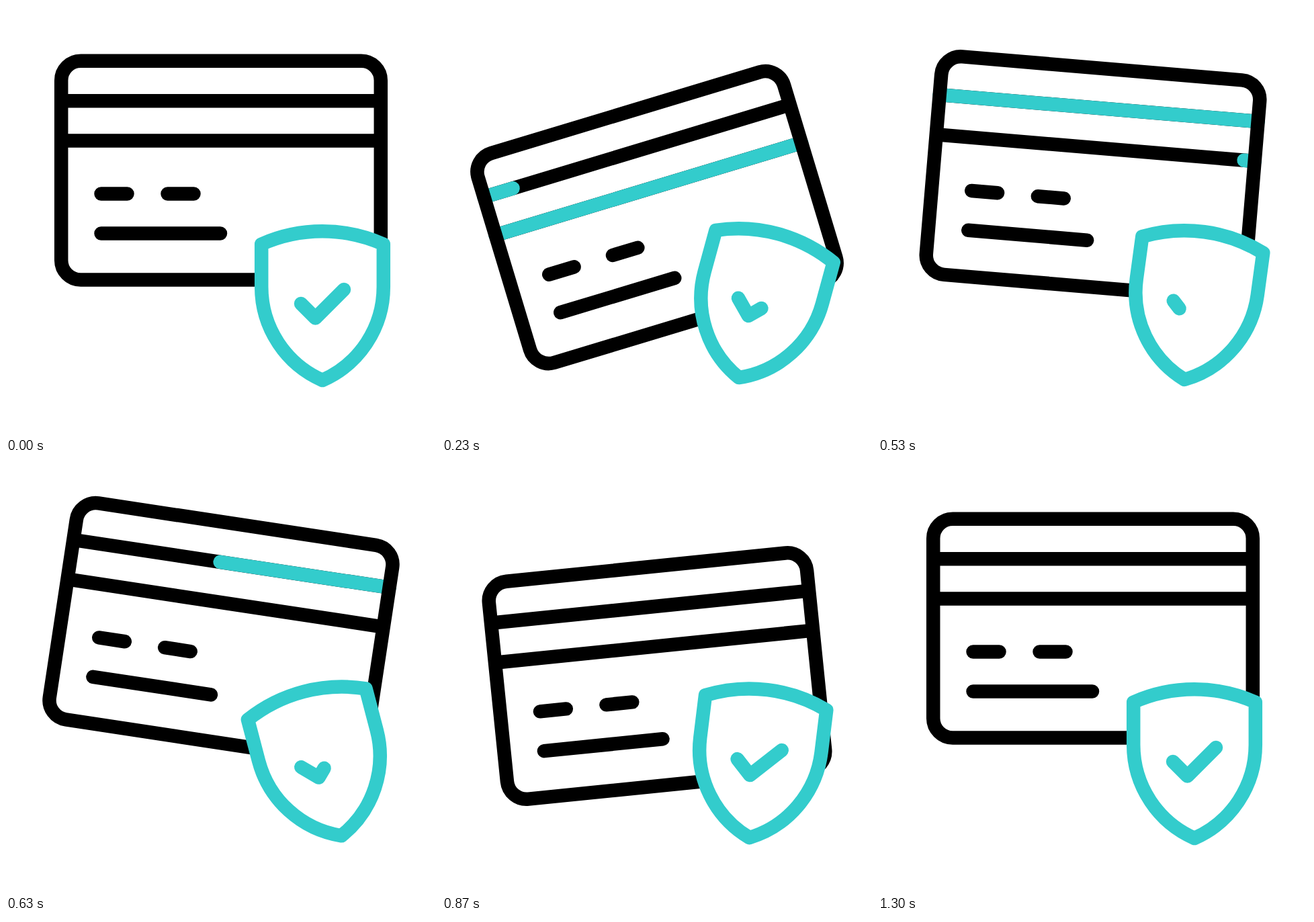
An HTML page that plays this animation: 640x640 px, repeating every 1.67 s.

```html
<!DOCTYPE html>
<html lang="en">
<head>
<meta charset="utf-8">
<title>Secure card</title>
<style>
  html, body { margin: 0; height: 100%; overflow: hidden; background: #fff; }
  svg { display: block; width: 100vw; height: 100vh; fill: none; stroke: #000; stroke-width: 20.5; stroke-linejoin: round; }
  .round { stroke-linecap: round; }
  .teal { stroke: #3cc; stroke-linecap: round; }
</style>
</head>
<body>
<svg viewBox="0 0 640 640">
  <g id="card">
    <path d="M82 141.2H558M82 200.5H558"/>
    <path id="upper" class="teal"/>
    <path id="lower" class="teal"/>
    <rect x="82.2" y="81.8" width="475.6" height="325.6" rx="29"/>
    <path class="round" d="M141.5 279.5H180.5M240.5 279.5H279.5M141.5 338.6H319"/>
  </g>
  <g id="shield" class="teal">
    <path fill="#fff" d="M380.2 354.5A224 224 0 0 1 561.8 354.5V418A152 152 0 0 1 471 557A152 152 0 0 1 380.2 418Z"/>
    <path id="check" pathLength="1" d="M439 443L460.5 464.5L503 422"/>
  </g>
</svg>
<script>
const LOOP = 1670, FPS = 30;
const el = id => document.getElementById(id);

// Keys are [frame, value] pairs.
const tilt = [[0, 0], [7, -16.8], [9.2, -20], [13, -7.3], [16, 4.8], [18, 10], [19, 8.6], [25, -6], [26, -5.8], [31, -2.6], [36, 0]];
const drop = [[0, 0], [7, 70], [8.1, 74], [13, 37], [16, 10.5], [18, 0], [19, 6], [24.8, 74], [26, 71], [31, 23], [35, 0]];
const sway = [[0, 0], [13, 27.4], [19.3, -15], [26, 7], [32, -1.5], [39, 0]];
const tick = [[2.2, 1], [13, 0], [24.8, 1]];

// Monotone cubic interpolation: flat at peaks and at both ends.
function at(keys, f) {
  const last = keys.length - 1;
  if (f <= keys[0][0]) return keys[0][1];
  if (f >= keys[last][0]) return keys[last][1];
  const slope = i => (keys[i + 1][1] - keys[i][1]) / (keys[i + 1][0] - keys[i][0]);
  const tangent = i => {
    if (i === 0 || i === last) return 0;
    const a = slope(i - 1), b = slope(i);
    return a * b > 0 ? 2 * a * b / (a + b) : 0;
  };
  const i = keys.findIndex(k => k[0] > f) - 1;
  const [x0, y0] = keys[i], [x1, y1] = keys[i + 1];
  const h = x1 - x0, p = (f - x0) / h, q = 1 - p;
  return y0 + (y1 - y0) * p * p * (3 - 2 * p) + h * p * q * (q * tangent(i) - p * tangent(i + 1));
}

// A stripe fills from the left, then empties from the left.
function stripe(id, y, f, fill, empty) {
  const edge = start => 82 + 476 * at([[start, 0], [start + 6.3, 1]], f);
  const from = edge(empty), to = edge(fill);
  el(id).setAttribute("d", to - from > 0.5 ? `M${from} ${y}H${to}` : "");
}

function draw(now) {
  const f = Math.floor((now % LOOP + 4) * FPS / 1000);
  el("card").setAttribute("transform", `translate(0 ${at(drop, f)}) rotate(${at(tilt, f)} 320 244.5)`);
  el("shield").setAttribute("transform", `rotate(${at(sway, f)} 471 446)`);
  stripe("lower", 200.5, f, 0.5, 10.4);
  stripe("upper", 141.2, f, 5.8, 16);
  const shown = at(tick, f);
  el("check").style.strokeDasharray = shown < 1 ? `${shown} 2` : "none";
  el("check").style.display = shown > 0 ? "" : "none";
}

const start = performance.now();
function loop() {
  draw(performance.now() - start);
  requestAnimationFrame(loop);
}
loop();
</script>
</body>
</html>
```
